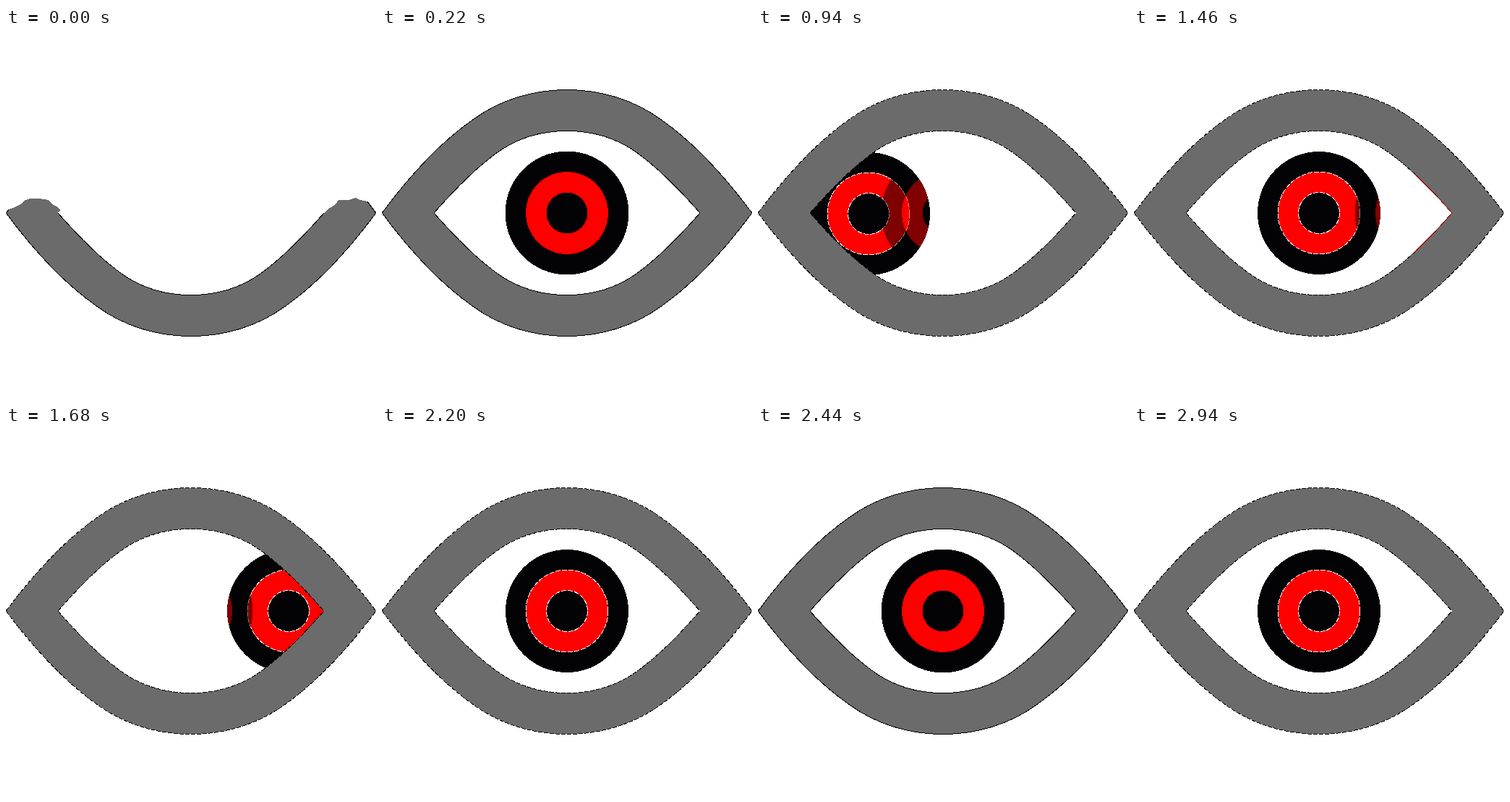
Animation of 512 by 512 pixels, one loop 2.96 s. Source, as an HTML page:

```html
<!DOCTYPE html>
<html lang="en">
<head>
<meta charset="utf-8">
<title>Blinking eye</title>
<style>
  html, body { margin: 0; height: 100%; overflow: hidden; background: #fff; }
  svg { display: block; width: 100%; height: 100%; }
</style>
</head>
<body>
<svg id="eye" viewBox="0 0 512 512" shape-rendering="crispEdges" fill="none"></svg>
<script>
const eye = document.getElementById('eye');
const GREY = '#6b6b6b', BLACK = '#030204', RED = '#f00';
const DISC = 85.5, RING = 57, PUPIL = 28.5;

const CLOSED = null, AHEAD = { x: 256, y: 256 }, LEFT = { x: 153, y: 257 }, RIGHT = { x: 391, y: 256 };
const SHORT_POSES = [CLOSED, LEFT, RIGHT, CLOSED];   // each is followed by a look ahead

const flip = d => d.replace(/([\d.]+),([\d.]+)/g, (_, x, y) => `${x},${512 - y}`);
const outerTop = 'M0,256C40,202 85,155 127,126C164,99 210,85.5 256,85.5C302,85.5 348,99 385,126C427,155 472,202 512,256';
const innerTop = 'M72,256C100,224 128,195 160,172C188,152 221,142.5 256,142.5C291,142.5 324,152 352,172C384,195 412,224 440,256';
const outerLow = flip(outerTop), innerLow = flip(innerTop);
const opening = innerTop + innerLow;
const lids = outerTop + outerLow + opening;
const tips = 'M0,256L3,251 12,248 20,244 27,238 34,236 46,236 59,238 64,244 70,247 75,252 72,256Z' +
  'M440,256L445,251 453,246 458,241 460,238 474,238 484,235 490,238 500,240 512,256Z';
const tipEdges = 'M0,256L4,251M500,240L512,256';

const circle = ({ x, y }, r, attrs = '') => `<circle cx="${x}" cy="${y}" r="${r}" ${attrs}/>`;
const path = (d, attrs = '') => `<path d="${d}" ${attrs}/>`;
const clip = (id, shape) => `<clipPath id="${id}">${shape}</clipPath>`;

function iris(pose, soft) {
  const hairline = soft ? 'stroke="#fff" stroke-dasharray="7 2"' : '';
  return circle(pose, soft ? DISC - .5 : DISC, `fill="${BLACK}"`) +
    circle(pose, RING, `fill="${RED}" ${hairline}`) +
    circle(pose, PUPIL, `fill="${BLACK}" ${hairline}`);
}

// The next iris shows through, but only inside the current one.
function ghost(pose, next) {
  return clip('disc', circle(pose, DISC - .5)) +
    `<g clip-path="url(#disc)"><g opacity=".5">${iris(next, false)}</g></g>`;
}

function draw(pose, next, soft) {
  const line = `stroke="#000" ${soft ? 'stroke-dasharray="6 2"' : ''}`;
  if (pose === CLOSED) {
    return path(outerLow + innerLow, `fill="${GREY}" fill-rule="evenodd"`) +
      path(tips, `fill="${GREY}"`) +
      path(outerLow + innerLow + tipEdges, line);
  }
  const shifts = soft && next !== CLOSED;
  let svg = clip('opening', path(opening)) +
    `<g clip-path="url(#opening)">${iris(pose, soft)}${shifts ? ghost(pose, next) : ''}</g>` +
    path(lids, `fill="${GREY}" fill-rule="evenodd" ${line}`);
  if (shifts && next !== AHEAD) {
    svg += clip('rim', circle(next, RING)) +
      `<g clip-path="url(#rim)">${path(opening, 'stroke="#a00000"')}</g>`;
  }
  return svg;
}

let shown = '';
function tick() {
  const t = performance.now() % 2960;
  const pair = Math.floor(t / 740), u = t % 740;
  const ahead = u >= 220;
  const soft = u >= 720 || (u >= 200 && !ahead);
  const key = [pair, ahead, soft].join();
  if (key !== shown) {
    shown = key;
    eye.innerHTML = ahead
      ? draw(AHEAD, SHORT_POSES[(pair + 1) % 4], soft)
      : draw(SHORT_POSES[pair], AHEAD, soft);
  }
  requestAnimationFrame(tick);
}
tick();
</script>
</body>
</html>
```
